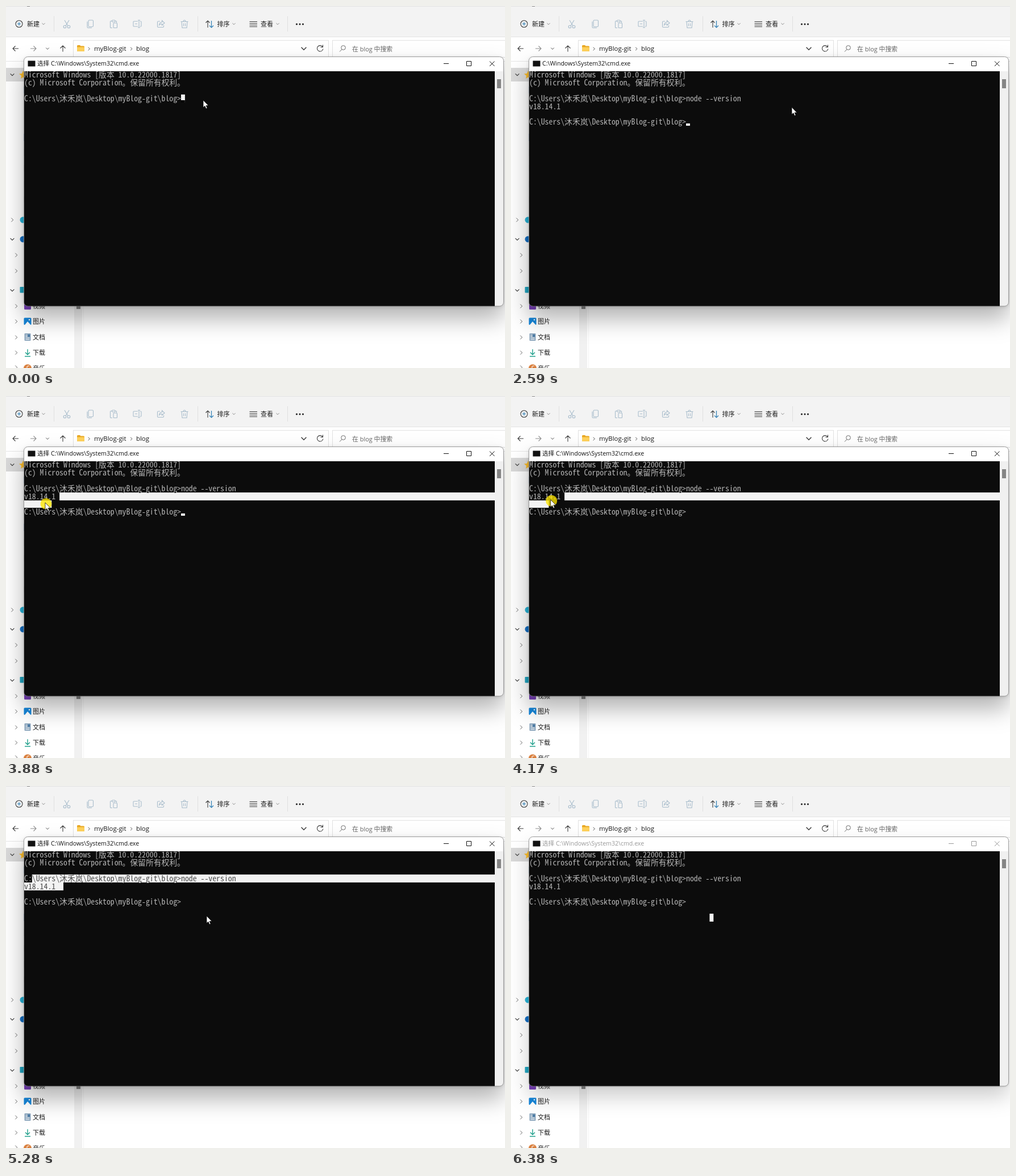
An HTML page that plays this animation: 878 px wide and 638 px high, repeating every 6470 ms.

```html
<!DOCTYPE html>
<html lang="zh-CN">
<head>
<meta charset="utf-8">
<title>Terminal demo</title>
<style>
html, body { margin: 0; width: 100%; height: 100%; overflow: hidden; background: #fff; }
svg { display: block; width: 878px; height: 638px; }
text { font: 11px "Open Sans", "Noto Sans CJK SC", sans-serif; fill: #1b1b1b; white-space: pre; }
.line { fill: none; stroke: #3c3c3c; stroke-width: 1.1; }
.thin { fill: none; stroke: #6b6b6b; stroke-width: 1; }
.off { fill: none; stroke: #a9bdcc; stroke-width: 1.1; }
.blue { fill: none; stroke: #2f7fb5; stroke-width: 1.2; }
#frame { fill: #fff; filter: drop-shadow(0 1px 3px rgba(0, 0, 0, .15)) drop-shadow(0 22px 20px rgba(0, 0, 0, .3)); }
#title { font-size: 10.6px; fill: #111; }
#buttons { fill: none; stroke: #111; stroke-width: 1; }
.inactive #frame { filter: drop-shadow(0 1px 2px rgba(0, 0, 0, .1)) drop-shadow(0 18px 18px rgba(0, 0, 0, .2)); }
.inactive #title { fill: #999; }
.inactive #buttons { stroke: #999; }
#term { isolation: isolate; }
#term text { font: 13.8px "Noto Sans Mono CJK SC", "Noto Sans CJK SC", monospace; fill: #b6b6b6; }
#sel { fill: #fff; mix-blend-mode: difference; }
</style>
</head>
<body>
<svg viewBox="0 0 878 638" xmlns="http://www.w3.org/2000/svg">
  <defs>
    <path id="down" d="M-3.4-1.7 0 1.7 3.4-1.7"/>
    <path id="right" d="M-1.7-3.4 1.7 0-1.7 3.4"/>
    <clipPath id="round"><rect x="31.500" y="89.500" width="844" height="439.500" rx="7"/></clipPath>
  </defs>

  <rect width="878" height="638" fill="#fff"/>

  <!-- Toolbar -->
  <rect width="878" height="54" fill="#f3f3f3"/>
  <path d="M0 .5H878M0 54.5H878" stroke="#e2e2e2"/>
  <path d="M37 .5h5" stroke="#888"/>
  <path d="M84.500 18v27M337.500 18v27M495.500 18v27" stroke="#e0e0e0"/>
  <g class="line"><circle cx="23" cy="31.500" r="6"/><path class="blue" d="M20 31.500h6M23 28.500v6"/></g>
  <text x="37" y="35.500">新建</text>
  <text x="371.500" y="35.500">排序</text>
  <text x="448" y="35.500">查看</text>
  <g class="thin">
    <use href="#down" transform="translate(66 31.500) scale(.75)"/>
    <use href="#down" transform="translate(401 31.500) scale(.75)"/>
    <use href="#down" transform="translate(478 31.500) scale(.75)"/>
  </g>
  <g class="off">
    <path d="M103 25l6 10M111 25l-6 10"/><circle cx="103.500" cy="36.500" r="2.300"/><circle cx="110.500" cy="36.500" r="2.300"/>
    <rect x="145" y="25" width="8.500" height="11.500" rx="1.500"/><path d="M143 27.500V37q0 1.500 1.500 1.500H151"/>
    <path d="M187 38.500h-2.500q-1 0-1-1v-10q0-1 1-1h2M192 26.500h1.500q1 0 1 1v2"/><rect x="186.500" y="25" width="5.500" height="3" rx="1"/><rect x="189" y="30" width="6.500" height="8.500" rx="1"/>
    <path d="M232 27h-7q-1 0-1 1v7q0 1 1 1h7M236 27h1q1 0 1 1v7q0 1-1 1h-1M234 25v13M232 25h4M232 38h4M227 31.500h4"/>
    <path d="M271 27h-3q-1.500 0-1.500 1.500V36q0 1.500 1.500 1.500h8q1.500 0 1.500-1.500v-2M269.500 33.500q1-5 5-5v-3l4.500 4.500-4.500 4v-2.500q-3 0-5 2z"/>
    <path d="M307.500 27.500h13M309 27.500l1 11h8l1-11M312 27.500q0-2.500 2-2.500t2 2.500M312.500 30.500v5M315.500 30.500v5"/>
  </g>
  <path class="line" d="M355 38V26M351.500 29.500l3.500-3.500 3.500 3.500"/>
  <path class="blue" d="M361.500 26v12M358 34.500l3.500 3.500 3.500-3.500"/>
  <path class="line" d="M428.500 27.500h13.500M428.500 30.500h13.500M428.500 33.500h13.500M428.500 36.500h13.500"/>
  <g fill="#222"><circle cx="511.500" cy="32" r="1.600"/><circle cx="517" cy="32" r="1.600"/><circle cx="522.500" cy="32" r="1.600"/></g>

  <!-- Address bar -->
  <path d="M0 97.500H878" stroke="#e6e6e6"/>
  <g fill="#fff" stroke="#e1e1e1"><rect x="118.500" y="60.500" width="449" height="30"/><rect x="574.500" y="60.500" width="320" height="30"/></g>
  <path class="line" d="M22 75H12M16.500 70.500 12 75l4.500 4.500M100 80.500V70M95.500 74.500 100 70l4.500 4.500"/>
  <path class="line" d="M43 75h10M48.500 70.500 53 75l-4.500 4.500" style="stroke:#909090"/>
  <g class="line">
    <use href="#down" transform="translate(73 75) scale(.8)"/>
    <use href="#right" transform="translate(146 75.500) scale(.8)"/>
    <use href="#right" transform="translate(220.500 75.500) scale(.8)"/>
    <use href="#down" transform="translate(524 75) scale(1.300)"/>
    <path d="M557 72a5.200 5.200 0 1 0 .8 3.500M557.500 68.500V72.500H553.500"/>
  </g>
  <path d="M125 70.500q0-1.500 1.500-1.500h3.500l1.500 1.500h5q1.500 0 1.500 1.500v6.500q0 1.500-1.500 1.500h-10q-1.500 0-1.500-1.500z" fill="#e8a824"/>
  <path d="M125 72.500h13v6q0 1.500-1.500 1.500h-10q-1.500 0-1.500-1.500z" fill="#ffd25c"/>
  <text x="155" y="79" style="font-size:11.400px">myBlog-git</text>
  <text x="229" y="79" style="font-size:11.400px">blog</text>
  <g class="thin"><circle cx="593.500" cy="73.500" r="3.800"/><path d="M591 76.500l-4 4"/></g>
  <text x="609" y="79.500" style="font-size:10.900px;fill:#666">在 blog 中搜索</text>

  <!-- Side panel -->
  <rect y="109" width="60" height="24" fill="#d9d9d9"/>
  <path d="M30 114l2 5 5 .5-4 3.500 1 5-4-2.500-4 2.500 1-5-4-3.500 5-.5z" fill="#f6b92b"/>
  <rect x="120" y="500" width="14" height="138" fill="#f1f1f1"/>
  <rect x="124" y="500" width="7" height="34" fill="#868686"/>
  <path d="M136.500 98V638" stroke="#f4f4f4"/>
  <path d="M31.500 142v12M31.500 225v13" stroke="#2a7ab8"/>
  <path d="M31.500 252v12M31.500 280v12M31.500 308v12M31.500 336v10" stroke="#ccc"/>
  <circle cx="30" cy="377" r="5.500" fill="#28b4d8"/>
  <circle cx="30" cy="411" r="5.500" fill="#1670c4"/>
  <rect x="24.500" y="495" width="13" height="10.500" rx="1" fill="#22a5c0"/>
  <g id="chevrons"></g>
  <rect x="32" y="523" width="12" height="12" rx="1.500" fill="#7840b8"/>
  <rect x="31.500" y="549.500" width="13" height="12.500" rx="1.500" fill="#1686d9"/>
  <path d="M33 562l5-6 5.500 6z" fill="#fff"/><circle cx="41" cy="553" r="1.200" fill="#fff"/>
  <rect x="32.500" y="577" width="11" height="13" rx="1" fill="#8ca6bd"/>
  <path d="M34.500 580h3M34.500 582.500h3M34.500 585h7M34.500 587.500h7" stroke="#fff" stroke-width=".9"/><rect x="38.500" y="579" width="3.500" height="4" fill="#4678a4"/>
  <path d="M38 605v9M34 610.500l4 4 4-4M33 617.500h10" fill="none" stroke="#1f9f8b" stroke-width="1.400"/>
  <circle cx="38" cy="638.500" r="7" fill="#d9803f"/><path d="M37 640v-5l4-1" fill="none" stroke="#fff"/>
  <text x="47" y="533">视频</text>
  <text x="47" y="560">图片</text>
  <text x="47" y="587.500">文档</text>
  <text x="47" y="615">下载</text>
  <text x="47" y="642.500">音乐</text>

  <!-- Console window -->
  <g id="win">
    <rect id="frame" x="31.500" y="89.500" width="844" height="439.500" rx="7"/>
    <g clip-path="url(#round)">
      <rect x="860" y="115" width="16" height="415" fill="#f0f0f0"/>
      <rect x="864" y="129" width="7" height="16" fill="#858585"/>
      <g id="term">
        <rect x="32" y="115" width="828" height="414" fill="#0c0c0c"/>
        <g id="rows"></g>
        <rect id="caret" width="6.900" height="4" fill="#fff"/>
        <path id="sel"/>
      </g>
    </g>
    <rect x="31.500" y="89.500" width="844" height="439.500" rx="7" fill="none" stroke="#777" stroke-opacity=".7"/>
    <rect x="38.500" y="96.500" width="13" height="10" fill="#111"/>
    <text id="title" x="55" y="105"></text>
    <path id="buttons" d="M770 101.500h9M810.500 97.500h8v8h-8zM851 97.500l8.500 8.500M859.500 97.500l-8.500 8.500"/>
  </g>

  <circle id="halo" r="10" fill="#ffe600" fill-opacity=".77"/>
  <path id="mouse" d="M0 0V12.800L2.900 10.200 5 15 7.100 14.100 5 9.500H9.200Z" fill="#fff" stroke="#000" stroke-width=".7"/>
</svg>
<script>
const LOOP = 6470, LEFT = 32, TOP = 114.6, CW = 6.9, CH = 13.8, COLS = 120;
const $ = id => document.getElementById(id);
const raw = String.raw;
const rowTop = row => Math.round(TOP + row * CH);

function add(parent, tag, attrs, text = "") {
  const node = document.createElementNS("http://www.w3.org/2000/svg", tag);
  for (const k in attrs) node.setAttribute(k, attrs[k]);
  node.textContent = text;
  parent.append(node);
  return node;
}
const show = (node, on) => node.style.display = on ? "" : "none";

// One character per grid cell, wide characters take two.
function print(row, col, text) {
  const xs = [];
  for (const ch of text) {
    xs.push((LEFT + col * CW).toFixed(1));
    col += ch > "\u2e80" ? 2 : 1;
  }
  return add($("rows"), "text", { x: xs.join(" "), y: TOP + row * CH + 11.8 }, text);
}

const prompt = raw`C:\Users\沐禾岚\Desktop\myBlog-git\blog>`;
print(0, 0, "Microsoft Windows [版本 10.0.22000.1817]");
print(1, 0, "(c) Microsoft Corporation。保留所有权利。");
print(3, 0, prompt);
const timed = [
  [940, print(3, 40, "node --version")],
  [2020, print(4, 0, "v18.14.1")],
  [2080, print(6, 0, prompt)]
];

for (const [kind, x, ys] of [
  ["down", 11, [121, 411, 501]],
  ["right", 11, [377]],
  ["right", 18, [439, 467, 529, 556, 584, 611, 637]]
]) for (const y of ys)
  add($("chevrons"), "use", {
    href: "#" + kind, x, y, class: kind === "down" ? "line" : "thin"
  });

// time, x, y of the pointer tip
const path = [
  [0, 347, 166], [1260, 347, 166], [1400, 440, 184], [1510, 494.6, 179],
  [1650, 494, 178.4], [2590, 494, 178.4], [2670, 494, 178], [2890, 494, 178],
  [3060, 330, 171], [3260, 107, 165], [3420, 80, 168], [3530, 96, 176],
  [3630, 97, 177], [3880, 69, 188], [4080, 62, 187], [4270, 78, 178],
  [4550, 72, 175], [4720, 66, 172], [4920, 49, 164], [4960, 49, 164],
  [5110, 190, 204], [5270, 353, 229], [5480, 353, 229], [5570, 398, 286],
  [5800, 570, 430], [6110, 804, 640], [LOOP, 804, 660]
];
function pointer(t) {
  let i = 1;
  while (i < path.length - 1 && path[i][0] <= t) i++;
  const [t0, x0, y0] = path[i - 1], [t1, x1, y1] = path[i];
  const k = (t - t0) / (t1 - t0);
  return [x0 + (x1 - x0) * k, y0 + (y1 - y0) * k];
}

const PRESS = 3630, RELEASE = 4960, CLICK = 5340;
const cell = ([x, y]) =>
  Math.floor((y - TOP) / CH) * COLS + Math.floor((x - LEFT) / CW);

function selection(t) {
  if (t < 860) return [3 * COLS + 40, 3 * COLS + 40];
  if (t < PRESS) return null;
  if (t >= CLICK) return [8 * COLS + 46, 8 * COLS + 46];
  const anchor = 4 * COLS + 9;
  const head = cell(pointer(Math.min(t, RELEASE) - 60));
  return [Math.min(anchor, head), Math.max(anchor, head)];
}

function selectionPath(range) {
  if (!range) return "";
  const [a, b] = range;
  let d = "";
  for (let r = Math.floor(a / COLS); r * COLS <= b; r++) {
    const from = Math.max(a - r * COLS, 0), to = Math.min(b - r * COLS + 1, COLS);
    d += `M${LEFT + from * CW} ${rowTop(r)}H${LEFT + to * CW}V${rowTop(r + 1)}H${LEFT + from * CW}z`;
  }
  return d;
}

const blink = [[0, 340], [860, 1390], [1920, 3010], [3540, 4070], [4600, 5130], [5660, 6380]];
const within = (t, spans) => spans.some(([a, b]) => t >= a && t < b);

function caretCell(t) {
  if (t < 940) return [3, 40];
  if (t < 1930) return [3, 54];
  if (t < 2020) return [4, 0];
  if (t < 2080) return [5, 0];
  return [6, 40];
}

function draw(t) {
  const range = selection(t);
  const [x, y] = pointer(t);
  const [row, col] = caretCell(t);
  const running = t >= 1930 && t < 2080;
  for (const [from, node] of timed) show(node, t >= from);
  $("title").textContent = (range ? "选择 " : "") +
    raw`C:\Windows\System32\cmd.exe` + (running ? " - node  --version" : "");
  $("sel").setAttribute("d", selectionPath(range));
  $("caret").setAttribute("x", LEFT + col * CW);
  $("caret").setAttribute("y", rowTop(row + 1) - 4);
  show($("caret"), within(t, blink));
  $("mouse").setAttribute("transform", `translate(${x} ${y})`);
  $("halo").setAttribute("transform", `translate(${x + 1.5} ${y + 2})`);
  show($("halo"), within(t, [[PRESS, RELEASE], [CLICK, CLICK + 110]]));
  $("win").classList.toggle("inactive", t >= 6380);
}

const start = performance.now();
function tick() {
  draw((performance.now() - start) % LOOP);
  requestAnimationFrame(tick);
}
tick();
</script>
</body>
</html>
```
